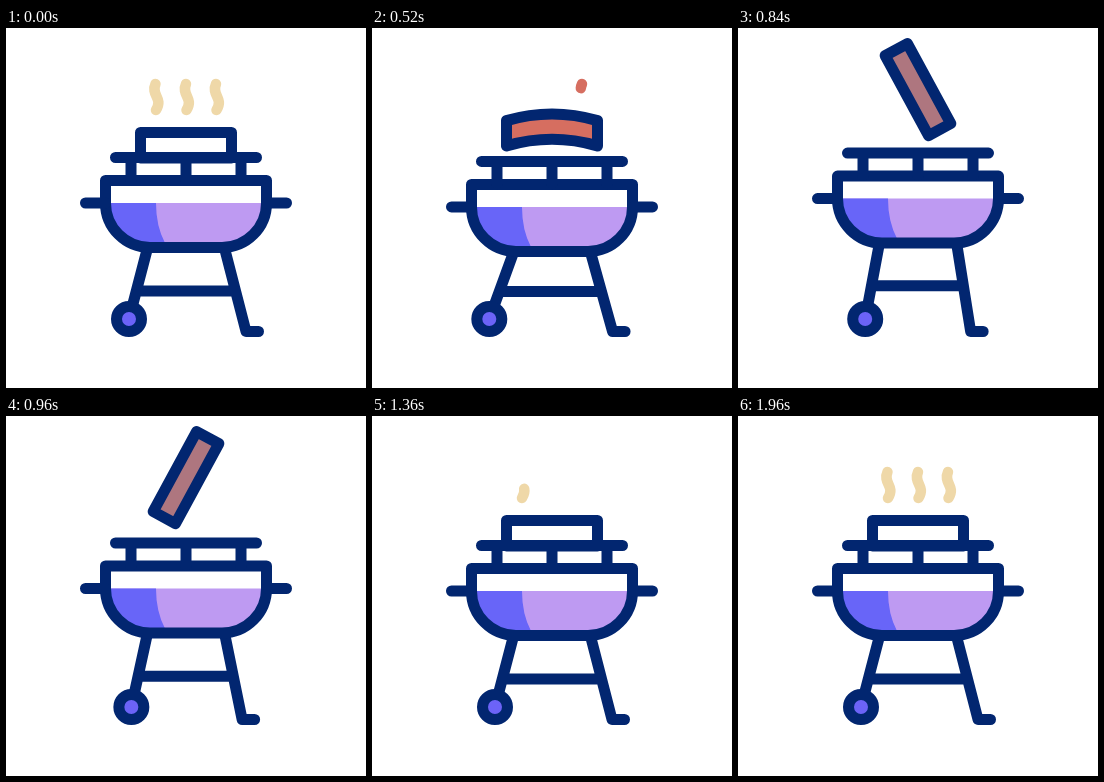
Recreate the animation shown at these times as an HTML page. Size 360x360 px, loop 2.16 s.

```html
<!DOCTYPE html>
<html lang="en">
<head>
<meta charset="utf-8">
<title>Barbecue</title>
<style>
html, body { margin: 0; width: 100%; height: 100%; overflow: hidden; background: #fff; }
svg { display: block; width: 100vw; height: 100vh; }
.line { fill: none; stroke: #022670; stroke-width: 11; stroke-linecap: round; stroke-linejoin: round; }
.steam { fill: none; stroke-width: 10.5; stroke-linecap: round; }
</style>
</head>
<body>
<svg viewBox="0 0 360 360">
  <defs>
    <path id="bowl" d="M99.5 152.5H260.5V175a44.5 44.5 0 0 1-44.5 44.5H144a44.5 44.5 0 0 1-44.5-44.5Z"/>
    <clipPath id="inside"><use href="#bowl"/></clipPath>
  </defs>
  <g id="steam"></g>
  <path id="legs" class="line"/>
  <circle id="wheel" class="line" cy="291" r="12.5" style="fill:#6c63f7"/>
  <path id="meat" class="line"/>
  <g id="grill">
    <g clip-path="url(#inside)">
      <path fill="#fff" d="M95 150H265V176H95Z"/>
      <path fill="#be9af2" d="M95 175H265V225H95Z"/>
      <path fill="#6865f8" d="M95 175H150Q150 198 159 215V225H95Z"/>
    </g>
    <use href="#bowl" class="line"/>
    <path class="line" d="M79.5 175H99.5M260.5 175H280.5M109.5 129.5H250.5M125 129.5V152M180 129.5V152M235 129.5V152"/>
  </g>
</svg>
<script>
const LOOP = 2160, STEP = 40;
const $ = id => document.getElementById(id);
const ease = (t, from, to) => {
  const u = Math.min(1, Math.max(0, (t - from) / (to - from)));
  return u * u * (3 - 2 * u);
};

// Eased value along [time, value] keys
function track(t, keys) {
  let value = keys[0][1];
  for (let i = 1; i < keys.length; i++) {
    const [t0, v0] = keys[i - 1], [t1, v1] = keys[i];
    value += (v1 - v0) * ease(t, t0, t1);
  }
  return value;
}

const bodyKeys = [[0, 0], [280, 5], [460, 5], [760, -5], [1160, 0]];
const wheelKeys = [[0, 123], [280, 116.7], [480, 116.7], [760, 127.7], [1160, 123]];
const footKeys = [[0, 0], [280, 5], [400, 5], [720, -9], [1160, 0]];
const meatKeys = [[0, 117.2], [280, 122.2], [440, 122.2], [670, 61.6], [1180, 61.6], [1340, 117.2]];
const fadeStart = [80, 170, 280], growStart = [1200, 1360, 1520];

const plumes = [149.5, 180, 210].map(x => {
  const p = document.createElementNS('http://www.w3.org/2000/svg', 'path');
  p.setAttribute('class', 'steam');
  p.setAttribute('d', `M${x} 56c-5 11 8 14 .5 26`);
  p.setAttribute('pathLength', 1);
  return $('steam').appendChild(p);
});

function drawSteam(t) {
  const color = t < 140 || t >= 900 ? '#efd8a8' : t < 380 ? '#d2d0d6' : '#d66e60';
  plumes.forEach((p, i) => {
    const growing = t >= 900;
    const length = growing
      ? ease(t, growStart[i], growStart[i] + 400)
      : 1 - ease(t, fadeStart[i], fadeStart[i] + 320);
    p.style.display = length > 0.001 ? '' : 'none';
    p.style.stroke = color;
    p.setAttribute('stroke-dasharray', `${length} 3`);
    p.setAttribute('stroke-dashoffset', growing ? length - 1 : 0);
  });
}

function drawMeat(t) {
  const y = track(t, meatKeys), angle = 180 * ease(t, 620, 1180);
  const bend = t > 440 && t < 670 ? 15 * Math.sin(Math.PI * (t - 440) / 230) : 0;
  const top = -12.7, bottom = 12.7;
  $('meat').setAttribute('d',
    `M-45.5 ${top}Q0 ${top - bend} 45.5 ${top}V${bottom}Q0 ${bottom - bend} -45.5 ${bottom}Z`);
  $('meat').setAttribute('transform', `translate(180 ${y}) rotate(${angle})`);
  $('meat').style.fill = t < 400 || t >= 1280 ? '#fff'
    : t >= 680 && t < 1000 ? '#ae767f' : '#d66e60';
}

function drawGrill(t) {
  const dy = track(t, bodyKeys), wheel = track(t, wheelKeys), foot = track(t, footKeys);
  const hip = 222 + dy, ankle = 240 + foot, bar = 263 + 0.7 * foot;
  const left = 141 + (wheel - 141) * (bar - hip) / (291 - hip);
  const right = 219 + (ankle - 219) * (bar - hip) / (303.5 - hip);
  $('grill').setAttribute('transform', `translate(0 ${dy})`);
  $('wheel').setAttribute('cx', wheel);
  $('legs').setAttribute('d',
    `M141 ${hip}L${wheel} 291M219 ${hip}L${ankle} 303.5h12.5M${left} ${bar}H${right}`);
}

function frame() {
  const t = Math.floor(performance.now() % LOOP / STEP) * STEP;
  drawSteam(t);
  drawMeat(t);
  drawGrill(t);
  requestAnimationFrame(frame);
}
frame();
</script>
</body>
</html>
```
